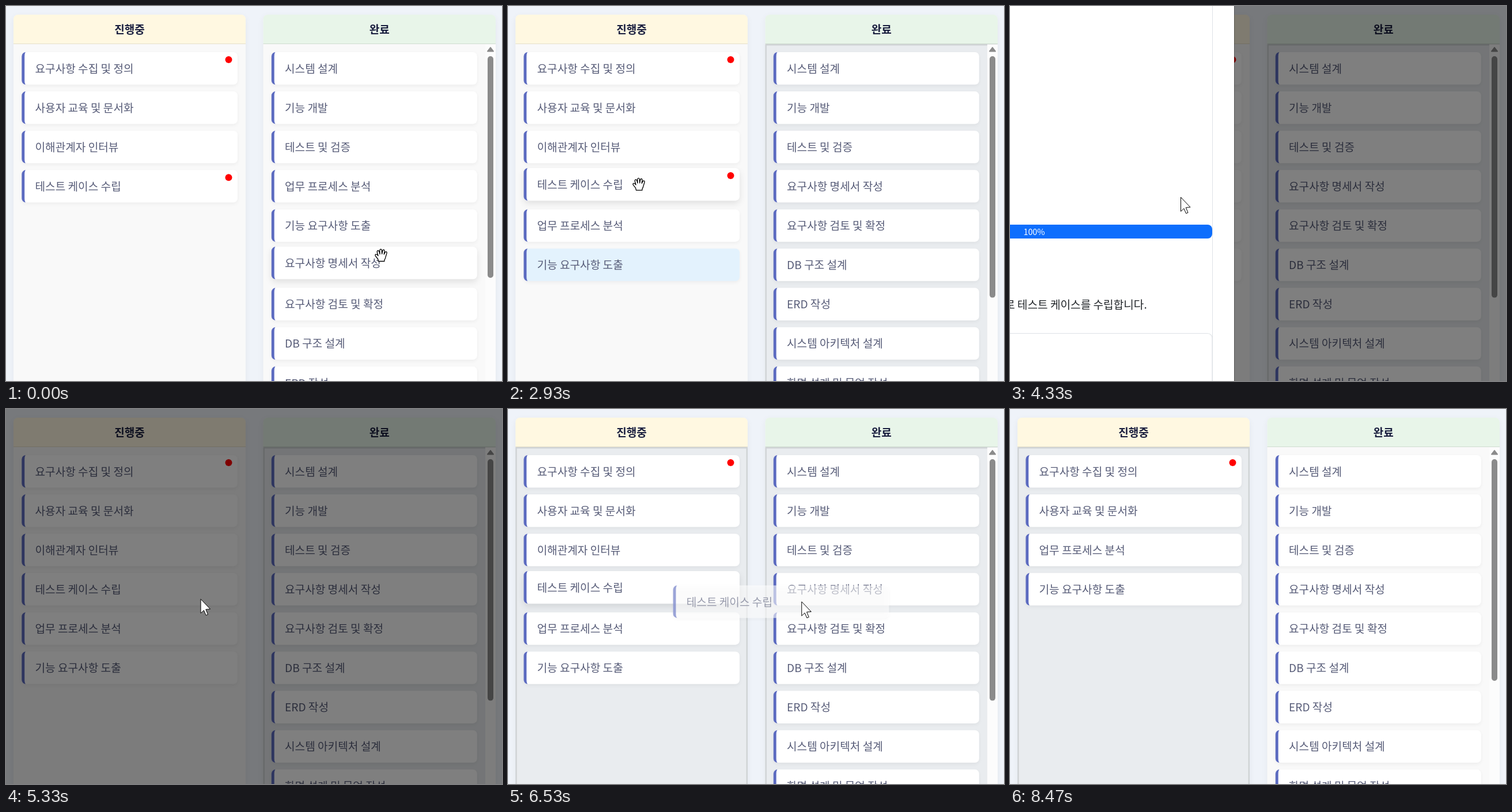
An HTML page with a canvas that plays this animation: 861 by 650 pixels, repeating every 9.4 s.

```html
<!DOCTYPE html>
<html lang="ko">
<head>
<meta charset="utf-8">
<title>Board</title>
<style>
  html, body { margin: 0; width: 861px; height: 650px; overflow: hidden; background: #eff3f9; }
  canvas { display: block; width: 861px; height: 650px; }
</style>
</head>
<body>
<canvas id="stage"></canvas>
<script>
const W = 861, H = 650, LOOP = 9400;
const canvas = document.getElementById('stage');
const ratio = window.devicePixelRatio || 1;
canvas.width = W * ratio;
canvas.height = H * ratio;
const ctx = canvas.getContext('2d');

const FAMILY = '"Noto Sans CJK KR", "Noto Sans KR", "Noto Sans CJK", sans-serif';
const PITCH = 68.1, CARD_H = 56.3, TOP = 80, RADIUS = 7.2, ACCENT = 4.9;
const COLS = [
  { x: 13, w: 403, cardX: 27.3, cardW: 374.7, title: '진행중', head: '#fff8e1' },
  { x: 446.5, w: 403.5, cardX: 460.8, cardW: 357, title: '완료', head: '#e8f5e9' }
];
const START = [
  ['요구사항 수집 및 정의', '사용자 교육 및 문서화', '이해관계자 인터뷰', '테스트 케이스 수립'],
  ['시스템 설계', '기능 개발', '테스트 및 검증', '업무 프로세스 분석', '기능 요구사항 도출',
   '요구사항 명세서 작성', '요구사항 검토 및 확정', 'DB 구조 설계', 'ERD 작성',
   '시스템 아키텍처 설계', '화면 설계 및 목업 작성']
];
const DRAGS = [
  { name: '업무 프로세스 분석', from: 1, to: 0, start: 400, drop: 1090 },
  { name: '기능 요구사항 도출', from: 1, to: 0, start: 1850, drop: 2350 },
  { name: '테스트 케이스 수립', from: 0, to: 1, start: 5850, drop: 6830 },
  { name: '이해관계자 인터뷰', from: 0, to: 1, start: 7560, drop: 8460 }
];
const OPEN = 3805, CLOSE = 5050, FREE = 5520;

// Pointer stops: time, x, y
const PATH = [
  [0, 651, 432], [60, 651, 432], [350, 612, 318], [400, 612, 318], [1020, 240, 392],
  [1100, 232, 394], [1670, 586, 325], [1840, 584, 323], [2280, 232, 438], [2380, 228, 440],
  [2960, 227, 308], [3940, 227, 308], [4330, 296, 331], [4760, 440, 370], [5070, 442, 371],
  [5530, 268, 301], [5700, 250, 312], [5850, 250, 312], [6700, 539, 336], [6840, 539, 340],
  [7400, 246, 253], [7560, 246, 253], [8460, 600, 710]
];

const HAND = new Path2D('M-4.5 10.5L-5.5 6.5L-9.5 1.5Q-11 -1 -8.8 -1.6Q-7 -2 -5 1L-6.8 -5.5' +
  'Q-7 -8 -5 -8Q-3.6 -8 -3 -5.5L-2 -2L-2.3 -8.5Q-2 -10.5 -.5 -10.5Q1.2 -10.5 1.3 -8.5L1.6 -2.2' +
  'L2.8 -8Q3.4 -9.8 5 -9.4Q6.4 -9 6 -7L5.2 -1.5L7 -5Q8 -6.5 9.3 -5.9Q10.6 -5.2 10 -3.4' +
  'L8 3Q7.5 6 6 8L5.8 10.5Z');
const ARROW = new Path2D('M.5 .5V25L5.9 20L9.6 28.6L13 27.2L9.3 18.4L17 17.8Z');

const clamp = v => Math.max(0, Math.min(1, v));
const ramp = (t, start, span) => clamp((t - start) / span);
const easeOut = p => 1 - (1 - p) * (1 - p);

function pointer(t) {
  const i = PATH.findIndex(p => p[0] > t);
  if (i < 0) return PATH[PATH.length - 1].slice(1);
  const [t0, x0, y0] = PATH[Math.max(0, i - 1)], [t1, x1, y1] = PATH[i];
  const p = ramp(t, t0, t1 - t0), e = p * p * (3 - 2 * p);
  return [x0 + (x1 - x0) * e, y0 + (y1 - y0) * e];
}

function listsAt(t) {
  const lists = START.map(l => l.slice());
  for (const d of DRAGS) {
    if (t < d.drop) break;
    lists[d.from] = lists[d.from].filter(n => n !== d.name);
    lists[d.to].push(d.name);
  }
  return lists;
}

const dragAt = t => DRAGS.find(d => t >= d.start && t < d.drop);
const cardY = i => TOP + i * PITCH;

function hovered(t) {
  const drag = dragAt(t);
  if (drag) return drag.name;
  if (t >= OPEN && t < FREE) return null;
  const [x, y] = pointer(t), lists = listsAt(t);
  for (let c = 0; c < 2; c++) {
    const { cardX, cardW } = COLS[c];
    if (x < cardX || x > cardX + cardW) continue;
    const i = Math.floor((y - TOP) / PITCH);
    if (i >= 0 && y - cardY(i) < CARD_H) return lists[c][i] || null;
  }
  return null;
}

// Share of the last 120 ms spent under the pointer, per card
function liftsAt(t) {
  const lifts = {};
  for (let k = 0; k < 10; k++) {
    const name = hovered(Math.max(0, t - k * 12));
    if (name) lifts[name] = (lifts[name] || 0) + 0.1;
  }
  return lifts;
}

function activeCols(t) {
  const over = d => t >= d.start && t < d.drop;
  const x = pointer(t)[0];
  const left = (DRAGS.slice(0, 2).some(over) && x < 416) || t >= DRAGS[2].start;
  const right = (t >= DRAGS[0].start && t < DRAGS[2].drop) || (over(DRAGS[3]) && x > 446);
  return [left, right];
}

function box(x, y, w, h, r, fill) {
  ctx.beginPath();
  ctx.roundRect(x, y, w, h, r);
  ctx.fillStyle = fill;
  ctx.fill();
}

function shadow(y, blur, alpha) {
  ctx.shadowColor = `rgba(0,0,0,${alpha})`;
  ctx.shadowOffsetY = y * ratio;
  ctx.shadowBlur = blur * ratio;
}

function noShadow() {
  ctx.shadowColor = 'transparent';
  ctx.shadowOffsetY = ctx.shadowBlur = 0;
}

function text(str, x, y, size, color, weight = 400, align = 'left') {
  ctx.font = `${weight} ${size}px ${FAMILY}`;
  ctx.textAlign = align;
  ctx.fillStyle = color;
  ctx.fillText(str, x, y);
}

function dot(x, y) {
  ctx.beginPath();
  ctx.arc(x, y, 6, 0, Math.PI * 2);
  ctx.fillStyle = '#ff0000';
  ctx.fill();
}

function card(name, x, y, w, lift, fill, marked) {
  y -= lift * 3.2;
  shadow(2.4 + lift * 2.4, 6 + lift * 6, 0.05 + lift * 0.05);
  box(x, y, w, CARD_H, RADIUS, fill);
  noShadow();
  // Accent: the card outline minus an inner edge with elliptical corners
  const inner = { x: RADIUS - ACCENT, y: RADIUS };
  ctx.beginPath();
  ctx.roundRect(x, y, w / 2, CARD_H, [RADIUS, 0, 0, RADIUS]);
  ctx.roundRect(x + ACCENT, y, w / 2 - ACCENT, CARD_H, [inner, 0, 0, inner]);
  ctx.fillStyle = '#5c6bc0';
  ctx.fill('evenodd');
  text(name, x + 23.2, y + 35.7, 19.12, '#575c78');
  if (marked) dot(x + w - 15.5, y + 13);
}

function cardFill(name, t) {
  const d = DRAGS.find(m => m.name === name && m.to === 0);
  if (!d || t < d.drop) return '#ffffff';
  const p = ramp(t, d.drop + 600, 250);
  return `rgb(${227 + 28 * p},${242 + 13 * p},${253 + 2 * p})`;
}

const isMarked = (name, t) =>
  name === START[0][0] || (name === START[0][3] && t < OPEN);

function column(c, list, active, lifts, t) {
  const { x, w, cardX, cardW, title, head } = COLS[c];
  shadow(3, 12, 0.05);
  box(x, 15, w, 700, 8, '#f9f9f9');
  noShadow();
  box(x, 15, w, 51, [8, 8, 0, 0], head);
  ctx.fillStyle = 'rgba(0,0,0,.1)';
  ctx.fillRect(x, 65, w, 1);
  text(title, x + w / 2, 47.6, 19.12, '#1a1f3f', 700, 'center');
  if (active) {
    ctx.fillStyle = '#e9ecef';
    ctx.fillRect(x, 66, w, H);
    ctx.strokeStyle = '#cfd3d5';
    ctx.lineWidth = 2.4;
    ctx.strokeRect(x + 1.2, 67.2, w - 2.4, H);
  }
  list.forEach((name, i) => {
    if (cardY(i) < H + 10)
      card(name, cardX, cardY(i), cardW, lifts[name] || 0, cardFill(name, t), isMarked(name, t));
  });
}

function scrollbar(count) {
  ctx.fillStyle = '#fcfcfc';
  ctx.fillRect(832, 66.5, 18, H);
  ctx.beginPath();
  ctx.moveTo(841, 72);
  ctx.lineTo(846, 78.5);
  ctx.lineTo(836, 78.5);
  ctx.closePath();
  ctx.lineJoin = 'round';
  ctx.lineWidth = 2;
  ctx.fillStyle = ctx.strokeStyle = '#8b8b8b';
  ctx.fill();
  ctx.stroke();
  const end = 471.2 + (START[1].length - count) * 17.2;
  box(836, 87, 10, end - 87, 5, '#8b8b8b');
}

function dialog(t) {
  const dim = 0.5 * (ramp(t, OPEN, 150) - ramp(t, CLOSE + 300, 150));
  if (dim <= 0) return;
  ctx.fillStyle = `rgba(0,0,0,${dim})`;
  ctx.fillRect(0, 0, W, H);

  const shown = ramp(t, OPEN + 160, 150) - ramp(t, CLOSE, 150);
  if (shown <= 0) return;
  const slide = easeOut(ramp(t, OPEN + 160, 300)) - easeOut(ramp(t, CLOSE, 300));
  ctx.save();
  ctx.globalAlpha = shown;
  ctx.translate(0, -60 * (1 - slide));
  ctx.fillStyle = 'rgba(0,0,0,.3)';
  ctx.fillRect(389, -100, 1, 900);
  ctx.fillStyle = '#ffffff';
  ctx.fillRect(-10, -100, 399, 900);
  ctx.fillStyle = '#dee2e6';
  ctx.fillRect(351, -100, 1, 900);
  box(-300, 379, 651, 24, 8, '#0d6efd');
  text('100%', 42, 397, 14.4, '#ffffff', 400, 'center');
  text('로 테스트 케이스를 수립합니다.', -9, 525.3, 19.12, '#212529');
  ctx.beginPath();
  ctx.roundRect(-300, 567.5, 651, 300, 8);
  ctx.strokeStyle = '#dee2e6';
  ctx.lineWidth = 1.2;
  ctx.stroke();
  ctx.restore();
}

function ghost(t) {
  const d = dragAt(t);
  if (!d) return;
  const [x, y] = pointer(t), [px, py] = pointer(d.start);
  const col = COLS[d.from], i = listsAt(t)[d.from].indexOf(d.name);
  ctx.save();
  ctx.globalAlpha = 0.6;
  card(d.name, col.cardX + x - px, cardY(i) + y - py, col.cardW, 0, '#ffffff', isMarked(d.name, t));
  ctx.restore();
}

function cursor(t) {
  const [x, y] = pointer(t);
  const hand = hovered(t) && !dragAt(t);
  ctx.save();
  ctx.translate(x, y);
  ctx.lineJoin = 'round';
  ctx.lineWidth = hand ? 1.3 : 1;
  ctx.fillStyle = '#ffffff';
  ctx.strokeStyle = '#000000';
  ctx.fill(hand ? HAND : ARROW);
  ctx.stroke(hand ? HAND : ARROW);
  ctx.restore();
}

function draw(t) {
  ctx.setTransform(ratio, 0, 0, ratio, 0, 0);
  ctx.fillStyle = '#eff3f9';
  ctx.fillRect(0, 0, W, H);
  const lists = listsAt(t), lifts = liftsAt(t), active = activeCols(t);
  column(0, lists[0], active[0], lifts, t);
  column(1, lists[1], active[1], lifts, t);
  scrollbar(lists[1].length);
  dialog(t);
  ghost(t);
  cursor(t);
}

const begin = performance.now();
function tick() {
  draw((performance.now() - begin) % LOOP);
  requestAnimationFrame(tick);
}
tick();
</script>
</body>
</html>
```
